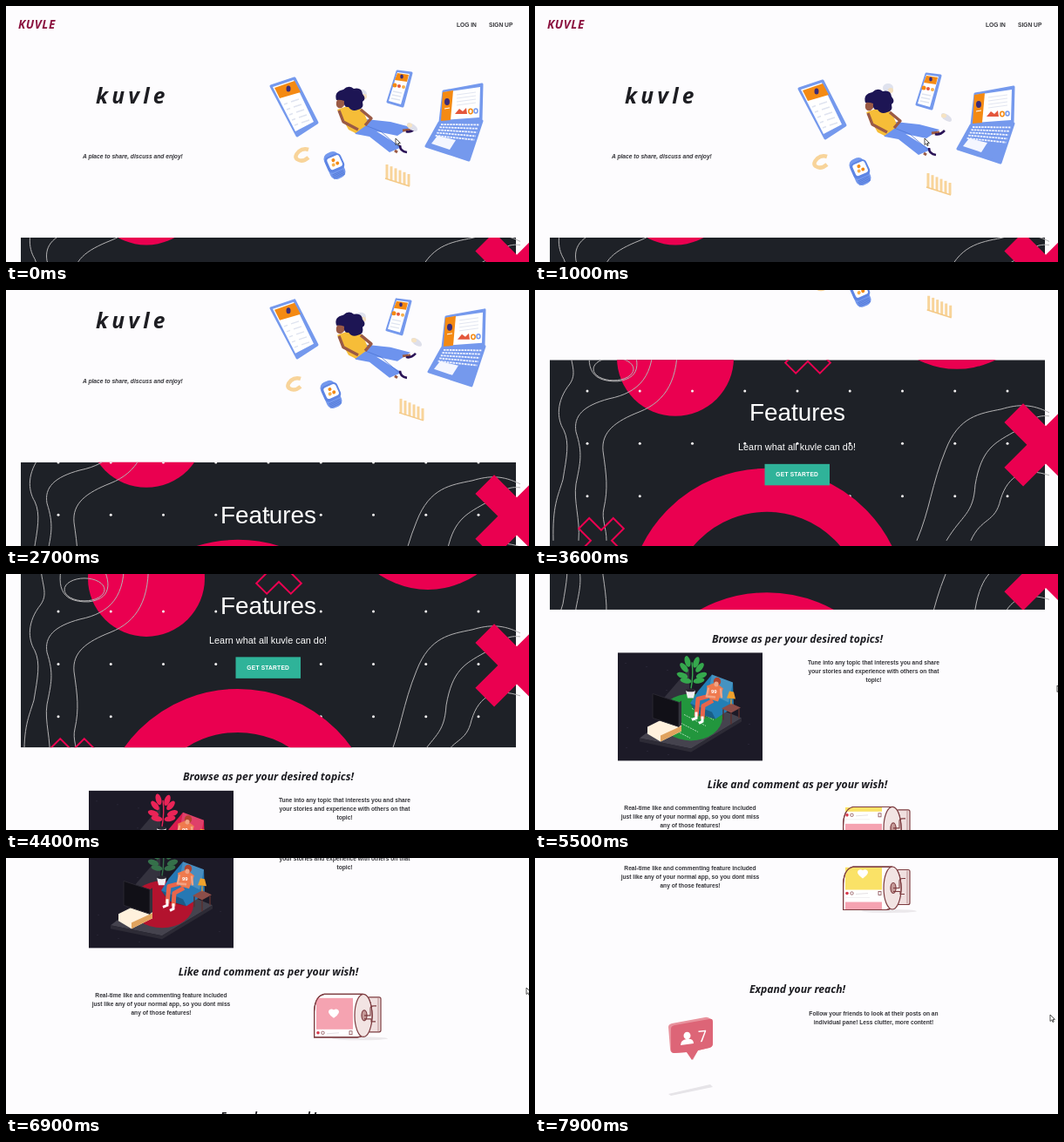
These frames come from a looping animation (600x294 px, 8000 ms). An HTML page:

```html
<!DOCTYPE html>
<html lang="en">
<head>
<meta charset="utf-8">
<title>kuvle</title>
<style>
  html, body { margin: 0; width: 100%; height: 100%; overflow: hidden; background: #fdfcfe; }
  svg { display: block; width: 600px; height: 294px; }
  .sans { font: bold 6.67px "Liberation Sans", Arial, sans-serif; fill: #333338; }
  .head { font: italic bold 12.2px "Open Sans", sans-serif; fill: #1d1d22; }
  .mid { text-anchor: middle; }
  .contour { fill: none; stroke: #b4b3b4; stroke-width: 1; }
</style>
</head>
<body>
<svg id="stage" viewBox="0 0 600 294" xmlns="http://www.w3.org/2000/svg"></svg>
<script>
const LOOP = 8000;
const PINK = '#ea0050', DARK = '#1e2127', BLUE = '#7599ed', ORANGE = '#f48a13', SAND = '#f8d49a';

const poly = (points, fill, extra = '') => `<polygon points="${points}" fill="${fill}" ${extra}/>`;
const line = (d, stroke, width = 1, extra = '') =>
  `<path d="${d}" fill="none" stroke="${stroke}" stroke-width="${width}" ${extra}/>`;
const rect = (x, y, w, h, fill, extra = '') =>
  `<rect x="${x}" y="${y}" width="${w}" height="${h}" fill="${fill}" ${extra}/>`;
const oval = (x, y, rx, ry, fill, extra = '') =>
  `<ellipse cx="${x}" cy="${y}" rx="${rx}" ry="${ry}" fill="${fill}" ${extra}/>`;
const text = (x, y, content, cls = 'sans', extra = '') =>
  `<text x="${x}" y="${y}" class="${cls}" ${extra}>${content}</text>`;
const paragraph = (x, y, rows) =>
  rows.map((row, i) => text(x, y + i * 10, row, 'sans mid')).join('');
const group = (id, content) => `<g id="${id}">${content}</g>`;
const repeat = (n, draw) => Array.from({ length: n }, (_, i) => draw(i)).join('');

// Diagonal cross made of two bars, as one outline.
function cross(x, y, len, half, style) {
  const d = `M${-half} ${-len}H${half}V${-half}H${len}V${half}H${half}V${len}H${-half}V${half}H${-len}V${-half}H${-half}Z`;
  return `<path d="${d}" transform="translate(${x} ${y}) rotate(45)" ${style}/>`;
}

function heroArt() {
  const round = 'stroke-linejoin="round" stroke-width="3"';
  const tablet =
    poly('303,95 330,86 356,137 333,152', BLUE, `stroke="${BLUE}" ${round}`) +
    poly('305,96 329,88 352,136 331,147', '#fff') +
    poly('307,97 330,89 337,102 313,109', ORANGE) +
    oval(323, 98, 2.5, 3.5, '#3a2b78') +
    repeat(5, i => line(`M${318 + i * 3} ${116 + i * 6}l4 -1.5m4 -1.5l9 -3`, '#dfe4f0', 1.4));
  const phone =
    poly('449,78 465,80 455,118 438,113', BLUE, `stroke="${BLUE}" ${round}`) +
    poly('449,79 463,81 453,116 439,112', '#fff') +
    poly('449,80 462,82 460,90 446,88', ORANGE) +
    oval(454, 84, 1.8, 2.5, '#3a2b78') +
    oval(446, 94, 2.5, 2.5, ORANGE) + oval(451, 95, 2, 2, '#e4573c') + oval(456, 96, 2, 2, '#f7b04a') +
    repeat(3, i => line(`M${444 - i} ${101 + i * 4}l10 2`, '#dfe4f0', 1.4));
  const laptop =
    poly('505,101 549,93 548,133 501,136', BLUE, `stroke="${BLUE}" ${round}`) +
    poly('506,102 547,96 546,131 503,134', '#fff') +
    poly('504,102 516,100 513,134 502,135', ORANGE) +
    oval(509, 113, 3, 4, '#3a2b78') + line('M506 121l6 -1', '#fff') +
    repeat(4, i => line(`M520 ${105 + i * 4}l22 -3`, '#e2e6f1')) +
    poly('518,127 523,121 527,124 531,120 532,127', '#e4573c') +
    oval(536, 124, 2.2, 2.7, 'none', `stroke="${ORANGE}" stroke-width="1.5"`) +
    oval(542, 123.5, 2, 2.5, 'none', `stroke="${BLUE}" stroke-width="1.5"`) +
    poly('500,137 549,135 534,180 485,164', BLUE, `stroke="${BLUE}" ${round}`) +
    repeat(5, i => line(`M${502 - i * 1.6} ${139 + i * 3.2}L${546 - i * 1.4} ${139.5 + i * 4.3}`, '#eef2ff', 1.8, 'stroke-dasharray="2.6 .8"')) +
    poly('498,152 519,157 512,168 491,161', '#f4f6ff');
  const woman =
    poly('397,142 413,133 441,136 464,142 449,152 425,147 454,165 440,171 417,153 401,150', '#6d93ee') +
    line('M412 140L430 147L452 166', '#4f76d6', .8) +
    line('M455 146l9 -1m-18 24l3 2', '#9a5a45', 3) +
    line('M459 147q5 2 11 -4m-18 20q0 7 8 8', '#2b1457', 2.6) +
    poly('380,122 394,117 409,122 416,138 401,149 393,145', '#f6bd38') +
    line('M382 123l5 13 17 9M407 122l12 10-7 8', '#9a5a45', 3.4, 'stroke-linejoin="round"') +
    oval(384, 114, 5, 6.5, '#9a5a45', 'transform="rotate(24 384 114)"') +
    `<path d="M379 111q-3 -10 8 -12q6 -6 12 -1q9 -2 10 6q5 6 0 9q2 8 -5 9q-7 3 -11 -3q-6 1 -5 -7q-5 -2 -9 -1Z" fill="#1d1554"/>`;
  const watch =
    `<g transform="translate(373 190) rotate(-24)">` +
    rect(-9, -16, 18, 32, BLUE, 'rx="7"') +
    repeat(4, i => line(`M-7 ${9 + i * 1.6}h14`, '#4c72d4', .7)) +
    rect(-9, -12, 20, 19, '#5e85e4', 'rx="5"') + rect(-6, -10, 15, 14, '#fff', 'rx="3"') +
    oval(1, -6, 2, 2, ORANGE) + oval(-1, -1, 2, 2, '#f7b04a') + oval(4, -1, 2, 2, ORANGE) + '</g>';
  const ring = line('M335 173q-6 -2 -11 2q-6 6 -2 9q6 4 13 -2', SAND, 4.5);
  const bars = repeat(6, i => line(`M${451 + i * 5} ${192 + i * 2.2}V${209 + i * 1.5}`, SAND, 3)) +
    line('M449 208L477 217', '#f4c987', 1.5);
  const puff = oval(472, 128, 7, 3.5, '#dedfea', 'transform="rotate(35 472 128)"') + oval(469, 126, 3, 2.5, '#f6e3c2');
  const puffHead = oval(405, 94, 6, 5, '#dfe2ee') + oval(408, 97, 3, 3, '#f2dfc0');
  const parts = { puffHead, tablet, phone, laptop, woman, watch, ring, bars, puff };
  return Object.entries(parts).map(([id, art]) => group(id, art)).join('');
}

function patternArt() {
  const contours = [
    'M40 -20C38 10 50 20 40 35C24 55 25 75 33 88C40 103 36 120 32 145C26 165 20 175 21 215',
    'M135 -20C138 25 120 45 85 52C55 60 44 72 47 90C55 115 52 125 47 150C44 170 52 190 50 215',
    'M163 -20C166 30 150 55 120 67C92 78 76 90 78 112C82 140 84 155 79 178C76 190 82 200 82 215',
    'M66 -20C58 12 60 33 95 32C125 28 120 5 105 -20',
    'M438 215C453 180 455 150 471 111C486 72 510 69 535 64C555 58 570 58 590 68',
    'M472 215C490 185 503 185 505 151C512 110 527 103 548 91C570 80 570 70 590 72',
    'M500 215C512 188 528 195 534 168C543 138 563 131 590 140'
  ];
  return oval(161, 5, 67, 67, PINK) + oval(484, -81, 99, 99, PINK) +
    repeat(45, i => oval(60 + (i % 9) * 60.25, -17.3 + Math.floor(i / 9) * 60.4, 1.5, 1.5, '#f5f3f3')) +
    oval(266, 292, 135, 135, 'none', `stroke="${PINK}" stroke-width="50"`) +
    contours.map(d => `<path class="contour" d="${d}"/>`).join('') +
    oval(90, 18, 23, 13, 'none', 'class="contour"') +
    cross(313, -3, 28, 8.5, `fill="none" stroke="${PINK}" stroke-width="2"`) +
    cross(76, 215, 28, 8.5, `fill="none" stroke="${PINK}" stroke-width="2"`) +
    cross(586, 105, 52, 15.3, `fill="${PINK}"`);
}

// Room picture in local units, 166 by 124.
function roomArt() {
  const leaves = [[-9, -8, 40], [9, -8, -40], [-11, 1, 70], [11, 1, -70], [-5, -15, 15], [5, -14, -20], [-7, 7, 80], [8, 7, -80]];
  return rect(0, 0, 166, 124, '#1c1a27') +
    repeat(16, i => oval((i * 47 + 9) % 164, (i * 31 + 12) % 120, .5, .5, '#3d3a4d')) +
    poly('25,98 86,52 142,75 84,110', '#45434e') + poly('25,98 84,110 142,75 142,79 84,114 25,102', '#2d2b36') +
    poly('44,62 82,18 82,52 66,80', '#34323e') +
    `<ellipse id="rug" cx="84" cy="74" rx="36" ry="27"/>` +
    group('field', repeat(5, i => line(`M${58 + i * 9} ${85 - i * 7}l25 13`, '#c9ecd0', .8, 'stroke-dasharray="2 1"'))) +
    poly('34,85 58,73 73,83 73,90 49,102 34,93', '#fff1dd') + poly('49,95 73,84 73,90 49,102', '#e0a35e') +
    poly('40,47 70,57 70,85 40,75', '#111017', 'stroke="#292731"') + poly('70,57 73,55 73,83 70,85', '#33313b') +
    `<g id="couch">${poly('83,58 92,44 108,25 132,34 133,62 112,76 92,70', 'currentColor')}` +
    poly('108,25 132,34 127,57 104,46', '#fff', 'opacity=".16"') + poly('83,58 108,68 112,76 92,72', '#000', 'opacity=".25"') + '</g>' +
    line('M104 50L92 53L90 73M109 55L98 61L97 76', '#e8654b', 5, 'stroke-linejoin="round"') +
    line('M90 68v7l-5 2M97 73v6l-4 2', '#fff', 3) +
    poly('102,38 112,34 121,41 115,56 105,53', '#ef7a4e') +
    line('M104 40l-2 10 10 1M118 41l1 11', '#f3a384', 2.5) + text(107, 47, '99', 'sans', 'style="fill:#fff;font-size:6px"') +
    oval(114, 33, 4.2, 4.6, '#b2452f') + oval(113, 36, 2.6, 2.8, '#f3a384') +
    poly('119,64 130,58 141,63 130,69', '#8d4e49') + line('M121 65v12m9 -8v13m9 -18v11', '#59302f', 1.5) +
    poly('125,52 128,44 133,45 135,53', '#f0a12c') + line('M130 53v6', '#f0a12c', 1.2) +
    poly('78,43 89,43 87,52 80,52', '#f0eef2') + oval(83.5, 43, 5.5, 1.8, '#2a2731') +
    `<g id="plant" transform="translate(85 25)">${line('M-1 16Q2 0 0 -14', 'currentColor', 1.4)}` +
    leaves.map(([x, y, a]) => oval(x, y, 3.2, 6.5, 'currentColor', `transform="rotate(${-a} ${x} ${y})"`)).join('') + '</g>';
}

// Paper roll in local units; paper posts are filled in by the animation.
function rollArt() {
  const outline = 'stroke="#7d3c40" stroke-width="1.2"';
  const heart = 'c-2 -3 -6 -1 -5 2q1 2.500 5 5q4 -2.500 5 -5c1 -3 -3 -5 -5 -2Z';
  const post = (y, color) => `<g transform="translate(0 ${y})">` + rect(3, 0, 42, 36, color) +
    `<path d="M23 15${heart}" fill="#fff" stroke="#fff" stroke-width="1.5"/>` +
    oval(5, 40, 1.8, 1.8, '#d8394c') + oval(10.5, 40, 1.7, 1.7, 'none', 'stroke="#884a4f" stroke-width=".8"') +
    line('M15 41l14 -1', '#e5e1e4', 1) + rect(41, 38, 3, 4, 'none', 'stroke="#884a4f" stroke-width=".8"') +
    line('M3 45H31', '#efecef', .8) + '</g>';
  return oval(53, 51.5, 32, 2, '#ebe8eb') +
    rect(62, 4, 15, 40, '#f0dfdf', `rx="2" ${outline}`) + line('M74 5v38', '#a77477', .8) +
    `<path d="M12 .6Q0 3 .6 25V50H50Q66 48 67 25Q66 2 56 .6Z" fill="#fff" ${outline}/>` +
    `<g clip-path="url(#paper)">${group('posts', repeat(7, i => post((i - 3) * 50, i % 2 ? '#f5a3b1' : '#fae267')))}</g>` +
    `<path d="M12 .6Q0 3 .6 25V50H50Q66 48 67 25Q66 2 56 .6Z" fill="none" ${outline}/>` +
    oval(57, 25, 10, 24.5, '#f2e4e3', outline) + oval(58, 25, 3, 6, '#c59a98', outline) +
    line('M58 25h7v-8q0 -3 4 -3h3M58 29h8v3h5', '#7d3c40', 1.1);
}

const bubbleArt =
  poly('153,271 201,260 204,263 156,273', '#e6e4e8') +
  `<path d="M153 194q0 -3 4 -4l38 -7q3 -1 8 3l1 27q0 4 -4 5l-13 3-6 11-7 -9-14 1q-5 0 -5 -5Z" fill="#e8929d"/>` +
  `<path d="M156 196q0 -3 4 -4l40 -7q4 -1 4 3v25q0 4 -4 5l-13 3-7 11-6 -9-14 1q-4 0 -4 -4Z" fill="#dd6577"/>` +
  oval(174.500, 204, 4, 4.300, '#fff') + `<path d="M167 215q0 -6 7 -7q8 -1 8 5Z" fill="#fff"/>` +
  `<text id="count" x="187" y="211" transform="rotate(-6 192 204)" font-family="Lato, sans-serif" font-size="18" fill="#fff"></text>`;

const stage = document.getElementById('stage');
stage.innerHTML = `
  <defs>
    <clipPath id="band">${rect(0, 266, 600, 223.5, '#000')}</clipPath>
    <clipPath id="paper">${rect(1.2, 1.2, 47, 48.3, '#000', 'rx="2"')}</clipPath>
  </defs>
  ${rect(0, 0, 600, 294, '#fdfcfe')}
  <g id="page">
    ${text(14, 26, 'KUVLE', 'head', 'style="font-size:13.5px;letter-spacing:.6px;fill:#8b123f"')}
    ${text(517, 24, 'LOG IN')}${text(554, 24, 'SIGN UP')}
    ${text(103, 112, 'kuvle', 'head', 'style="font-size:24.5px;letter-spacing:4.3px"')}
    ${text(88, 175, 'A place to share, discuss and enjoy!', 'sans', 'font-style="italic" style="font-style:italic"')}
    ${heroArt()}
    <g clip-path="url(#band)">
      ${rect(17, 266, 568, 223.5, DARK)}
      ${group('pattern', patternArt())}
    </g>
    ${text(301, 336, 'Features', 'sans mid', 'style="font-size:27.9px;font-weight:400;fill:#fff"')}
    ${text(300.5, 370, 'Learn what all kuvle can do!', 'sans mid', 'style="font-size:10.9px;font-weight:400;fill:#fff"')}
    ${rect(263.5, 385.5, 74.5, 24.5, '#2fb399')}
    ${text(300.7, 400, 'GET STARTED', 'sans mid', 'style="fill:#fff;letter-spacing:.2px"')}
    ${text(301, 527.5, 'Browse as per your desired topics!', 'head mid')}
    <g transform="translate(95 539)">${roomArt()}</g>
    ${paragraph(388.5, 552.5, ['Tune into any topic that interests you and share', 'your stories and experience with others on that', 'topic!'])}
    ${text(301, 694.5, 'Like and comment as per your wish!', 'head mid')}
    ${paragraph(178, 719.5, ['Real-time like and commenting feature included', 'just like any of your normal app, so you dont miss', 'any of those features!'])}
    <g transform="translate(353 715.5)">${rollArt()}</g>
    ${text(301, 861, 'Expand your reach!', 'head mid')}
    ${paragraph(388.5, 886.5, ['Follow your friends to look at their posts on an', 'individual pane! Less clutter, more content!'])}
    <g transform="translate(0 706)">${bubbleArt}</g>
  </g>
  <path id="cursor" d="M0 0V7.500L1.800 5.900L3 8.500L4.200 8L3 5.400H5.400Z" fill="#fff" stroke="#222" stroke-width=".8"/>`;

const el = id => document.getElementById(id);
const smooth = u => u * u * (3 - 2 * u);

// Value of a [time, ...values] key list at time t.
function track(keys, t, ease = u => u) {
  if (t <= keys[0][0]) return keys[0].slice(1);
  const i = keys.findIndex(key => key[0] > t);
  if (i < 0) return keys[keys.length - 1].slice(1);
  const a = keys[i - 1], b = keys[i];
  const u = ease((t - a[0]) / (b[0] - a[0]));
  return a.slice(1).map((v, k) => v + (b[k + 1] - v) * u);
}

const scrollKeys = [[2150, 0], [2700, 68], [4400, 290], [5500, 448.5], [6900, 559.5], [7900, 706]];
const paperKeys = [[5500, 20], [6900, -95], [7900, -159]];
const cursorKeys = [[1100, 447, 152], [1800, 586, 283], [2500, 604, 200], [5000, 603, 125], [5500, 599, 128], [6900, 597, 149], [7900, 591, 180]];
// Drift of each floating part: start, then later offset.
const drift = {
  tablet: [1, -3, 1, -6], phone: [0, -3, -1, 1], laptop: [-3, -3, 0, -2],
  woman: [0, -3, 0, -2], watch: [4, -7, 0, -2], ring: [12, -8, 3, -3],
  bars: [-14, -10, 2, 1], puff: [-6, 11, -1, 0], puffHead: [3, 7, 2, 5]
};
const moods = [
  { until: 4900, rug: '#c01543', plant: '#ea2457', couch: '#d91c4e' },
  { until: 6200, rug: '#22963d', plant: '#35a84d', couch: '#237fb5' },
  { until: LOOP, rug: '#b3132e', plant: '#35704a', couch: '#2678b4' }
];
const move = (id, x, y) => el(id).setAttribute('transform', `translate(${x} ${y})`);

function render(t) {
  const [scroll] = track(scrollKeys, t);
  move('page', 0, -scroll);
  // The pattern travels slower than the page.
  move('pattern', 0, scroll + 0.698 * (290 - scroll));

  for (const [id, [x0, y0, x2, y2]] of Object.entries(drift))
    move(id, ...track([[0, x0, y0], [1000, 0, 0], [2700, x2, y2], [4200, 0, 0]], t, smooth));

  const mood = moods.find(m => t < m.until);
  el('rug').setAttribute('fill', mood.rug);
  el('plant').style.color = mood.plant;
  el('couch').style.color = mood.couch;
  el('field').style.display = mood === moods[1] ? '' : 'none';

  move('posts', 0, (track(paperKeys, t)[0] % 100) + 50 - 50);
  el('count').textContent = t < 7250 ? 5 : t < 7600 ? 6 : 7;
  move('cursor', ...track(cursorKeys, t, smooth));
}

function tick(now) {
  render(now % LOOP);
  requestAnimationFrame(tick);
}
render(0);
requestAnimationFrame(tick);
</script>
</body>
</html>
```
